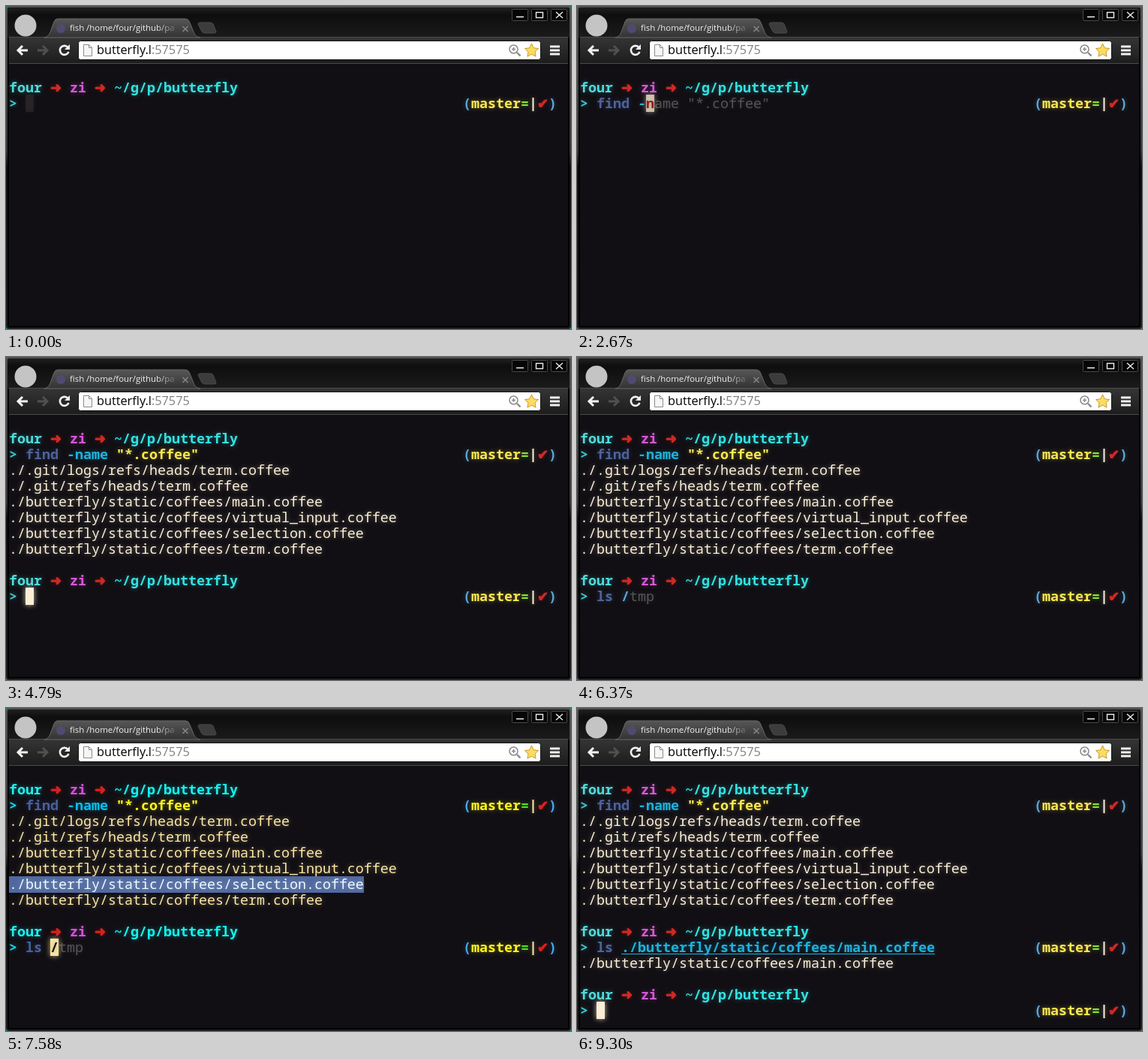
An HTML page with a canvas that plays this animation: 753x430 px, repeating every 9380 ms.

```html
<!DOCTYPE html>
<html lang="en">
<head>
<meta charset="utf-8">
<title>Terminal in a browser</title>
<style>
html, body { margin: 0; width: 100%; height: 100%; overflow: hidden; background: #000; }
svg, canvas { position: absolute; left: 0; top: 0; }
svg text { font-family: "Open Sans", "Noto Sans", sans-serif; }
</style>
</head>
<body>
<svg width="753" height="430" viewBox="0 0 753 430">
  <defs>
    <linearGradient id="strip" x2="0" y2="1"><stop stop-color="#1f1f1f"/><stop offset=".25" stop-color="#0e0e0e"/><stop offset="1" stop-color="#1b1b1b"/></linearGradient>
    <linearGradient id="tab" x2="0" y2="1"><stop stop-color="#565656"/><stop offset="1" stop-color="#333"/></linearGradient>
    <linearGradient id="bar" x2="0" y2="1"><stop stop-color="#353535"/><stop offset="1" stop-color="#1c1c1c"/></linearGradient>
    <linearGradient id="edge" x2="0" y2="1"><stop stop-color="#6a6a6a"/><stop offset=".45" stop-color="#4a4a4a"/><stop offset=".5" stop-color="#161616"/><stop offset="1" stop-color="#2a2a2a"/></linearGradient>
    <linearGradient id="fade" gradientUnits="userSpaceOnUse" x1="200" x2="228" y1="0" y2="0"><stop stop-color="#f0f0f0"/><stop offset="1" stop-color="#f0f0f0" stop-opacity=".1"/></linearGradient>
  </defs>
  <rect width="753" height="430" fill="#1a9f9f"/>
  <rect width="753" height="430" rx="4" fill="#000"/>
  <rect x="1" y="1" width="751" height="428" rx="3" fill="none" stroke="url(#edge)" stroke-width="1.5"/>
  <rect x="2" y="2" width="749" height="40" fill="url(#strip)"/>
  <rect x="4" y="41" width="745" height="36" fill="url(#bar)"/>
  <path d="M4 41.5H749" stroke="#4c4c4c"/>
  <path d="M51 42C57 41 58 37 60 32L64 21Q65.500 17 69 17H239Q243 17 244.500 21L249 32C251 37 252 41 259 42Z" fill="url(#tab)" stroke="#686868"/>
  <path d="M256 24Q256 22 259 22H272Q275 22 276 24L280 34Q280 36 278 36H265Q262 36 261 34Z" fill="#3c3c3c" stroke="#4b4b4b"/>
  <circle cx="26" cy="26" r="14.500" fill="#c4c4c4"/>
  <circle cx="73" cy="30" r="6" fill="#514a70"/>
  <text x="85" y="33" font-size="11.400" fill="url(#fade)">fish /home/four/github/pa</text>
  <path d="M235.500 27L242.500 34M242.500 27L235.500 34" stroke="#858585" stroke-width="1.600"/>
  <g fill="#050505" stroke="#4a4a4a">
    <rect x="674.500" y="4.500" width="21" height="15" rx="1"/>
    <rect x="700.500" y="4.500" width="21" height="15" rx="1"/>
    <rect x="726.500" y="4.500" width="21" height="15" rx="1"/>
  </g>
  <g fill="none" stroke="#eee" stroke-width="1.400">
    <path d="M680 14.500H690M733 8L742 16M742 8L733 16"/>
    <rect x="706.500" y="8.500" width="9" height="7"/>
  </g>
  <g fill="none" stroke-width="3">
    <path d="M29 59H17M22 53L16 59L22 65" stroke="#f2f2f2"/>
    <path d="M42 59H54M49 53L55 59L49 65" stroke="#505050"/>
    <path d="M82.500 55A6 6 0 1 0 83.500 61" stroke="#f2f2f2" stroke-width="2.600"/>
  </g>
  <path d="M85 51V58H78Z" fill="#f2f2f2"/>
  <rect x="96.500" y="46.500" width="616" height="25" rx="3" fill="#fff" stroke="#111"/>
  <path d="M103.500 51.500H110.500L114.500 55.500V66.500H103.500ZM110.500 51.500V55.500H114.500" fill="#f6f6f6" stroke="#8c8c8c"/>
  <text x="121" y="64" font-size="16.300" fill="#000">butterfly.l<tspan fill="#808080">:57575</tspan></text>
  <g fill="none" stroke="#8a8a8a" stroke-width="1.500">
    <circle cx="676.500" cy="57.500" r="5.500"/>
    <path d="M674 57.500H679M676.500 55V60"/>
    <path d="M681 62L685.500 66.500" stroke-width="2.400"/>
  </g>
  <path d="M700.500 50L703.300 55.800L709.500 56.600L705 61L706.100 67.200L700.500 64.200L694.900 67.200L696 61L691.500 56.600L697.700 55.800Z" fill="#fbdc62" stroke="#c99a2a"/>
  <path d="M725 54H738M725 59H738M725 64H738" stroke="#f0f0f0" stroke-width="3"/>
  <rect x="4" y="76" width="745" height="1" fill="#4a4a4a"/>
  <rect x="4" y="77" width="745" height="349" fill="#110f14"/>
</svg>
<canvas id="term" width="753" height="430"></canvas>
<script>
const LOOP = 9380, CELL = 11, ROW = 21, LEFT = 4, BASE = 115;
const MONO = '"Noto Sans Mono", "DejaVu Sans Mono", monospace';
const ctx = document.getElementById('term').getContext('2d');

// Font size whose advance is one cell
ctx.font = '100px ' + MONO;
const SIZE = 100 * CELL / ctx.measureText('M').width;

// Each colour: normal, and while selecting
const COLORS = {
  user: ['#4fdcdc', '#1ff0f0'], path: ['#34e2e2', '#12f5f0'], host: ['#d658d6', '#d84fe0'],
  red: ['#d02a26', '#d8221f'], mark: ['#3ec8cc', '#1ad8e8'], cmd: ['#4d639a', '#48609c'],
  arg: ['#1fb2dc', '#08bff0'], str: ['#fce94f', '#fff81a'], paren: ['#5ea8d8', '#4ba6ec'],
  eq: ['#8ae234', '#4fe01f'], fg: ['#fbeed5', '#fde7a4'], hint: ['#555555', '#555555'],
  dark: ['#110f14', '#110f14'], sel: ['#eefaff', '#eefaff']
};
const rgb = hex => [1, 3, 5].map(i => parseInt(hex.slice(i, i + 2), 16));
for (const k in COLORS) COLORS[k] = COLORS[k].map(rgb);

const clamp = v => Math.max(0, Math.min(1, v));
const ease = v => 1 - Math.pow(1 - clamp(v), 2.3);
const mix = (a, b, k) => a.map((v, i) => v + (b[i] - v) * k);
const css = (c, a = 1) => `rgba(${c.map(Math.round)},${a})`;

let mode = 0;
const color = name => mix(...COLORS[name], mode);

function put(x, row, text, c, bold) {
  const symbol = /[➜✔]/.test(text), y = BASE + row * ROW;
  ctx.font = (bold ? 'bold ' : '') + (symbol ? '17.9px "DejaVu Sans", sans-serif' : SIZE + 'px ' + MONO);
  ctx.fillStyle = ctx.strokeStyle = css(c);
  ctx.shadowColor = css(c, .4);
  ctx.shadowBlur = 6;
  ctx.fillText(text, x, y);
  ctx.shadowBlur = 0;
  if (symbol) ctx.strokeText(text, x, y);
  return x + (symbol ? 15 : CELL * text.length);
}
const cell = col => LEFT + col * CELL;
const run = (x, row, parts) => parts.forEach(([s, name]) => { x = put(x, row, s, color(name), true); });

function prompt(row) {
  run(LEFT, row, [['four ', 'user'], ['➜', 'red'], [' zi ', 'host'], ['➜', 'red'], [' ~/g/p/butterfly', 'path']]);
  run(LEFT, row + 1, [['>', 'mark']]);
  run(609, row + 1, [['(', 'paren'], ['master', 'str'], ['=', 'eq'], ['|', 'fg'], ['✔', 'red'], [')', 'paren']]);
}

// Cursor changes: [time, 0 fade out | 1 fade in | 2 solid]
const BLINK = [[-210, 0], [230, 1], [690, 0], [800, 2], [1160, 0], [1310, 2], [2110, 0], [2260, 2],
  [2630, 0], [2790, 2], [4020, 0], [4490, 1], [4950, 0], [5470, 2], [5850, 0], [6370, 1],
  [6800, 0], [7270, 1], [7740, 0], [8200, 1], [8600, 2]];

function glow(t) {
  const [start, kind] = BLINK.filter(b => b[0] <= t).pop();
  const k = ease((t - start) / 300);
  return kind === 2 ? 1 : kind ? k : 1 - k;
}

function cursor(t, col, row, char, name) {
  const c = glow(t), x = cell(col), y = BASE - 18 + row * ROW;
  ctx.globalAlpha = c;
  ctx.fillStyle = css(color('fg'));
  ctx.shadowColor = css(color('fg'), .8);
  ctx.shadowBlur = 7;
  ctx.fillRect(x, y, CELL, 23);
  ctx.shadowBlur = 0;
  ctx.globalAlpha = 1;
  if (char) put(x, row, char, mix(color(name), color('dark'), c ** 3), true);
}

const FIND = 'find -name "*.coffee"', LS = 'ls /tmp';
const DIR = './butterfly/static/coffees/', PICK = DIR + 'main.coffee';
const OUTPUT = ['./.git/logs/refs/heads/term.coffee', './.git/refs/heads/term.coffee',
  PICK, DIR + 'virtual_input.coffee', DIR + 'selection.coffee', DIR + 'term.coffee'];

const FIND_KEYS = [800, 1310, 1470, 1510, 1730, 2260];
for (let i = 0; i < 15; i++) FIND_KEYS.push(2790 + i * 45);
const LS_KEYS = [5470, 5550, 5630];
const typed = (keys, t) => keys.filter(k => k <= t).length;

function findLine(t) {
  const n = typed(FIND_KEYS, t), s = FIND.slice(0, n);
  run(cell(2), 1, [[s.slice(0, 4), n < 4 ? 'red' : 'cmd'], [s.slice(4, 10), 'arg'], [s.slice(10), 'str']]);
  if (t >= 3590) return;
  const hint = n && (t >= 2260 || t >= 1000 && t < 1730);
  if (hint) put(cell(n + 3), 1, FIND.slice(n + 1), color('hint'));
  cursor(t, n + 2, 1, hint ? FIND[n] : '', 'red');
}

function lsLine(t) {
  const pasted = t >= 8600, n = typed(LS_KEYS, t);
  run(cell(2), 10, [[LS.slice(0, Math.min(n, 2)), n < 2 ? 'red' : 'cmd']]);
  if (pasted) {
    put(cell(5), 10, PICK, color('arg'), true);
    ctx.fillRect(cell(5), BASE + 10 * ROW + 2, PICK.length * CELL, 1);
    if (t < 9180) cursor(t, 5 + PICK.length, 10);
  } else {
    if (n) put(cell(n + 3), 10, LS.slice(n + 1), color('hint'));
    cursor(t, n + 2, 10, n ? LS[n] : '', 'paren');
  }
}

// The selection climbs one row every 250 ms
const selected = t => t < 6650 || t >= 8540 ? -1 : Math.max(4, 9 - Math.floor((t - 6650) / 250));

function draw(t) {
  ctx.clearRect(0, 0, 753, 430);
  mode = ease((t - 6650) / 400) - ease((t - 8540) / 380);
  const pick = selected(t);
  if (pick > 0 && pick !== 8) {
    const width = pick === 9 ? 305 : OUTPUT[pick - 2].length * CELL;
    ctx.fillStyle = '#4f689f';
    ctx.fillRect(LEFT, 98 + pick * ROW, width, 22);
  }
  prompt(0);
  findLine(t);
  if (t >= 3630) OUTPUT.forEach((s, i) => put(LEFT, i + 2, s, color(i + 2 === pick ? 'sel' : 'fg')));
  if (t >= 3720) {
    prompt(9);
    lsLine(t);
  } else if (t >= 3590) cursor(t, 0, t < 3630 ? 2 : 8);
  if (t >= 9220) put(LEFT, 11, PICK, color('fg'));
  if (t >= 9300) {
    prompt(13);
    cursor(t, 2, 14);
  } else if (t >= 9180) cursor(t, 0, t < 9220 ? 11 : 12);
}

const begin = performance.now();
function tick() {
  draw((performance.now() - begin) % LOOP);
  requestAnimationFrame(tick);
}
tick();
</script>
</body>
</html>
```
